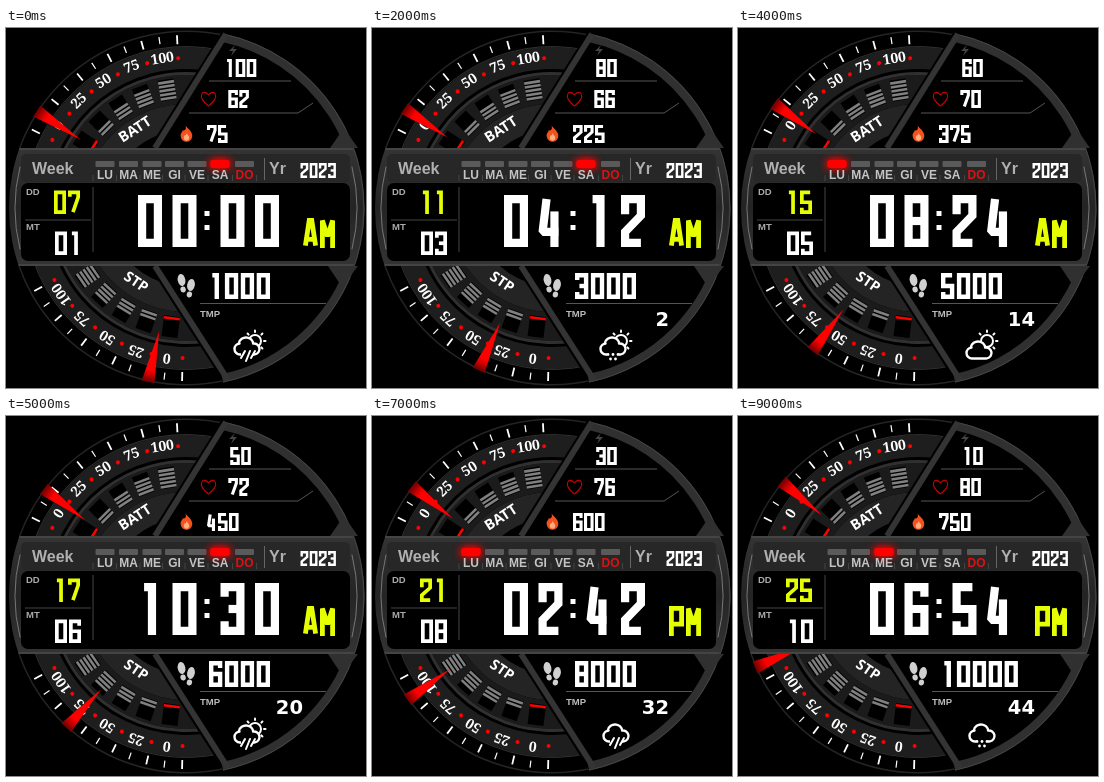
These frames come from a looping animation (360 by 360 pixels, 10 s). An HTML page with a canvas:

```html
<!DOCTYPE html>
<html lang="en">
<head>
<meta charset="utf-8">
<title>Watch face</title>
<style>
html, body { margin: 0; width: 100%; height: 100%; overflow: hidden; background: #000; }
canvas { display: block; }
</style>
</head>
<body>
<canvas id="face" width="360" height="360" role="img" aria-label="Watch face with date, time, battery, steps and weather"></canvas>
<script>
const ctx = document.getElementById('face').getContext('2d');
const C = 180, STEP_MS = 1000, STATES = 10;
const RAD = Math.PI / 180;
const SANS = '"Liberation Sans", Arial, sans-serif';
const RED = '#f00', YELLOW = '#e6ff00', WHITE = '#fff';
const DAYS = ['LU', 'MA', 'ME', 'GI', 'VE', 'SA', 'DO'];
const DAY_X = [99, 122.5, 146, 168.5, 191, 214, 238.5];
const WEATHER = ['sun rain', 'sun', 'sun snow', 'sun', 'sun', 'sun rain', 'sun snow', 'rain', '', 'snow'];

// Strokes on an 8 x 8 grid, each point written as "xy"
const GLYPHS = {
  0: '00 80 88 08 00 80',
  1: '10 50 58',
  2: '02 00 80 83 06 08 88',
  3: '01 00 80 88 08 07|24 84',
  4: '20 06 86|63 68',
  5: '80 00 04 84 88 08 07',
  6: '81 80 00 08 88 84 04',
  7: '01 00 80 82 38',
  8: '00 80 88 08 00 80|04 84',
  9: '84 04 00 80 88 08 07',
  A: '08 30 50 88|16 76',
  M: '08 00 45 80 88',
  P: '08 00 80 85 05'
};

function line(points, color, width = 1) {
  ctx.beginPath();
  points.forEach(([x, y]) => ctx.lineTo(x, y));
  ctx.strokeStyle = color;
  ctx.lineWidth = width;
  ctx.stroke();
}

function fillPoly(points, color) {
  ctx.beginPath();
  points.forEach(([x, y]) => ctx.lineTo(x, y));
  ctx.closePath();
  ctx.fillStyle = color;
  ctx.fill();
}

function disc(x, y, r, color) {
  ctx.beginPath();
  ctx.arc(x, y, r, 0, 2 * Math.PI);
  ctx.fillStyle = color;
  ctx.fill();
}

function box(x, y, w, h, r, color) {
  ctx.beginPath();
  ctx.roundRect(x, y, w, h, r);
  ctx.fillStyle = color;
  ctx.fill();
}

function label(str, x, y, font, color, align = 'left') {
  ctx.font = font;
  ctx.textAlign = align;
  ctx.fillStyle = color;
  ctx.fillText(str, x, y);
}

// Square condensed lettering: fixed pitch, size and stroke weight
function digits(str, x, y, [w, h, pitch, lw], color) {
  ctx.lineJoin = 'miter';
  ctx.miterLimit = 1.5;
  [...str].forEach((ch, i) => {
    GLYPHS[ch].split('|').forEach(stroke => {
      const pts = stroke.split(' ').map(p => [
        x + i * pitch + lw / 2 + p[0] / 8 * (w - lw),
        y + lw / 2 + p[1] / 8 * (h - lw)
      ]);
      // Square off straight ends so stems reach the full glyph box
      [pts, [...pts].reverse()].forEach(end => {
        const [a, b] = end.slice(-2);
        if (a[0] === b[0]) b[1] += lw / 2 * Math.sign(b[1] - a[1]);
      });
      line(pts, color, lw);
    });
  });
}

// Runs draw() with the origin on the dial centre and "up" pointing at the angle
function radial(deg, draw) {
  ctx.save();
  ctx.translate(C, C);
  ctx.rotate((deg + 90) * RAD);
  draw();
  ctx.restore();
}

function ring(r1, r2, from, to, color) {
  ctx.beginPath();
  ctx.arc(C, C, (r1 + r2) / 2, from * RAD, to * RAD);
  ctx.strokeStyle = color;
  ctx.lineWidth = r2 - r1;
  ctx.stroke();
}

function dial(start, name, nameDeg, flip, needleDeg, edge) {
  ctx.save();
  ctx.beginPath();
  edge.forEach(([x, y]) => ctx.lineTo(x, y));
  ctx.clip();
  const from = start - 26, to = start + 76;
  ring(78, 104, from, to, '#242424');
  ring(104, 133, from, to, '#1b1b1b');
  ring(133, 136, from, to, '#303030');
  ring(139, 161, from, to, '#1e1e1e');
  ring(161, 162, from, to, '#303030');
  ring(176, 177.5, from, to, '#242424');

  for (let i = 0; i < 11; i++) {
    radial(start - 6 + i * 6, () =>
      line([[0, i % 2 ? -166 : -164], [0, -173]], WHITE, i % 2 ? 1.2 : 1.8));
  }
  for (let i = 0; i < 6; i++) {
    radial(start - 6 + i * 12, () => disc(0, -150, 2, RED));
  }
  for (let i = 0; i < 5; i++) {
    radial(start + i * 12, () => {
      label(String(i * 25), 0, -147, 'bold 14px "Noto Serif", serif', WHITE, 'center');
      box(-8, -130, 16, 21, 0, '#000');
      for (let j = 0; j <= i; j++) {
        box(-8, -112.5 - j * 4, 16, 2.6, 0, i ? '#808080' : RED);
      }
    });
  }
  radial(nameDeg, () => {
    if (flip) ctx.rotate(Math.PI);
    label(name, 0, flip ? 94 : -89, '600 14.5px "Noto Sans", sans-serif', WHITE, 'center');
  });
  ctx.restore();
  radial(needleDeg, () => {
    const g = ctx.createLinearGradient(0, -179, 0, -166);
    g.addColorStop(0, '#600000');
    g.addColorStop(1, RED);
    fillPoly([[-6.5, -178], [6.5, -178], [0, -126]], g);
  });
}

function heart(x, y) {
  ctx.beginPath();
  ctx.moveTo(x, y + 7);
  ctx.bezierCurveTo(x - 13, y - 3, x - 5, y - 11, x, y - 4);
  ctx.bezierCurveTo(x + 5, y - 11, x + 13, y - 3, x, y + 7);
  ctx.strokeStyle = '#c80000';
  ctx.lineWidth = 1.1;
  ctx.stroke();
}

function flame(x, y, s, color) {
  ctx.beginPath();
  ctx.moveTo(x - s, y - 9 * s);
  ctx.bezierCurveTo(x + 2 * s, y - 5 * s, x + 7 * s, y - 2 * s, x + 6 * s, y + 3 * s);
  ctx.bezierCurveTo(x + 5 * s, y + 10 * s, x - 5 * s, y + 10 * s, x - 6 * s, y + 3 * s);
  ctx.bezierCurveTo(x - 7 * s, y - s, x - 4 * s, y - 2 * s, x - 4 * s, y - 4 * s);
  ctx.bezierCurveTo(x - s, y - 3 * s, x, y - 6 * s, x - s, y - 9 * s);
  ctx.fillStyle = color;
  ctx.fill();
}

function shoe(x, y, side) {
  const oval = (dx, dy, rx, ry) => {
    ctx.beginPath();
    ctx.ellipse(x + dx * side, y + dy, rx, ry, -0.2 * side, 0, 2 * Math.PI);
    ctx.fillStyle = '#d0d0d0';
    ctx.fill();
  };
  oval(0, -3, 3.8, 6);
  oval(1.6, 6.5, 2.7, 3);
}

function weather(kind) {
  const sun = kind.includes('sun'), x = sun ? 241 : 244;
  const y = sun ? (kind === 'sun' ? 322 : 318) : 317;
  ctx.save();
  ctx.lineCap = ctx.lineJoin = 'round';
  if (sun) {
    ctx.beginPath();
    ctx.arc(249, 313, 6, 0, 2 * Math.PI);
    ctx.strokeStyle = WHITE;
    ctx.lineWidth = 2;
    ctx.stroke();
    for (let a = -135; a <= 45; a += 45) {
      const c = Math.cos(a * RAD), s = Math.sin(a * RAD);
      line([[249 + 9 * c, 313 + 9 * s], [249 + 10.5 * c, 313 + 10.5 * s]], WHITE, 2);
    }
  }
  ctx.beginPath();
  ctx.arc(x - 7, y + 3, 5.5, 90 * RAD, 265 * RAD);
  ctx.arc(x - 1, y - 1, 7.5, 190 * RAD, 340 * RAD);
  ctx.arc(x + 7, y + 3, 5.5, 260 * RAD, 90 * RAD);
  ctx.closePath();
  ctx.fillStyle = '#000';
  ctx.fill();
  ctx.strokeStyle = WHITE;
  ctx.lineWidth = 2.4;
  ctx.stroke();
  if (kind.includes('rain')) {
    box(x - 6, y + 6, 12, 4, 0, '#000');
    for (let i = 0; i < 3; i++) {
      const px = x - 4 + i * 5, d = i === 1 ? 3 : 0;
      line([[px + 2, y + 5], [px - 2, y + 12 + d]], WHITE, 2);
    }
  }
  if (kind.includes('snow')) {
    box(x - 6, y + 6, 12, 4, 0, '#000');
    for (let i = 0; i < 5; i++) {
      disc(x - 5 + i * 2.5, y + (i % 2 ? 13 : 8.5), 1.4, WHITE);
    }
  }
  ctx.restore();
}

function sidePanels() {
  ring(170, 178.5, -78, 78, '#303030');
  ring(177.5, 178.5, -78, 78, '#454545');
  fillPoly([[324, 120], [338, 100], [352, 120]], '#303030');
  fillPoly([[322, 238], [336, 259], [352, 238]], '#303030');
  line([[220, 6], [149, 120]], '#343434', 6);
  line([[149, 238], [222, 352]], '#343434', 6);
  line([[203, 53], [285, 53]], '#555');
  line([[183, 85], [292, 85], [307, 75]], '#555');
  line([[194, 275.5], [320, 275.5]], '#555');

  fillPoly([[229, 17], [223, 23], [227, 23], [225, 28], [231, 21], [227, 21]], '#444');
  heart(202.5, 71);
  flame(180.5, 106, 0.95, '#f4511e');
  flame(180.5, 109, 0.45, '#ffb07a');
  shoe(175.5, 255, 1);
  shoe(185, 260, -1);
  label('TMP', 194, 289, `bold 9.5px ${SANS}`, '#bbb');
}

function band() {
  ctx.save();
  ctx.beginPath();
  ctx.arc(C, C, 177, 0, 2 * Math.PI);
  ctx.clip();
  const g = ctx.createLinearGradient(0, 120, 0, 238);
  g.addColorStop(0, '#343434');
  g.addColorStop(0.5, '#242424');
  g.addColorStop(1, '#343434');
  ctx.fillStyle = g;
  ctx.fillRect(0, 120, 360, 118);
  line([[0, 121], [360, 121]], '#444', 2);
  line([[0, 237], [360, 237]], '#444', 2);
  ctx.restore();
  ring(170.5, 171.5, 166, 194, '#777');
  ring(170.5, 171.5, -14, 14, '#777');
  box(15, 126, 329, 28, 5, '#272727');
  box(15, 155, 329, 78, 7, '#000');
  line([[87, 159], [87, 224]], '#444');
  line([[19, 192], [85, 192]], '#444');
  line([[258.5, 130], [258.5, 152]], '#666');

  label('Week', 26, 146, `bold 16px ${SANS}`, '#b0b0b0');
  label('Yr', 263, 146, `bold 16px ${SANS}`, '#b0b0b0');
  label('DD', 20, 167, `bold 9.5px ${SANS}`, '#aaa');
  label('MT', 20, 202, `bold 9.5px ${SANS}`, '#aaa');
  digits('2023', 294.5, 135, [7.8, 15, 9.2, 2.4], WHITE);
}

function weekdays(active) {
  DAYS.forEach((day, i) => {
    const x = DAY_X[i];
    ctx.save();
    if (i === active) {
      ctx.shadowColor = RED;
      ctx.shadowBlur = 9;
      box(x - 9.5, 132, 19, 8, 2, RED);
    }
    box(x - 9.5, 133, 19, 6, 1, i === active ? RED : '#5a5a5a');
    ctx.restore();
    line([[x - 12, 147], [x - 12, 153]], '#444');
    label(day, x, 151, `bold 12px ${SANS}`, i === 6 ? '#e01010' : '#c4c4c4', 'center');
  });
  line([[250.5, 147], [250.5, 153]], '#444');
}

const two = n => String(n).padStart(2, '0');

function draw(k) {
  ctx.fillStyle = '#000';
  ctx.fillRect(0, 0, 360, 360);

  dial(213, 'BATT', 237, false, 213 + Math.floor(0.8 * k + 0.1),
    [[0, 0], [218, 0], [143, 120], [0, 120]]);
  dial(97.3, 'STP', 124, true, 102.3 + 6 * k,
    [[0, 238], [143, 238], [221, 360], [0, 360]]);
  sidePanels();
  band();

  const day = 7 + 2 * k, month = 1 + k;
  const weekday = (new Date(2023, k, day).getDay() + 6) % 7;
  weekdays(weekday);
  const date = [12, 23.5, 14, 3.7];
  digits(two(day), 48, 162.5, date, YELLOW);
  digits(two(month), 49, 203.5, date, WHITE);

  const big = [24, 52, 34.5, 8.2];
  digits(two(2 * k % 12), 132, 167, big, WHITE);
  digits(two(6 * k), 214.5, 167, big, WHITE);
  box(198.5, 183, 5, 5, 0, WHITE);
  box(198.5, 197, 5, 5, 0, WHITE);
  digits(k < 6 ? 'AM' : 'PM', 297, 190, [15, 30, 17, 4.8], YELLOW);

  const small = [9.6, 18, 11, 3.1];
  const battery = String(100 - 10 * k);
  digits(battery, 234.5 - battery.length * 5.5 + 0.7, 31, small, WHITE);
  digits(String(62 + 2 * k), 222.3, 62, small, WHITE);
  digits(String(75 + 75 * k), 201, 97, small, WHITE);
  digits(String(1000 * (k + 1)), 203, 245, [13.3, 26, 15.9, 4.4], WHITE);

  const temp = 6 * k - 10;
  if (temp >= 0) label(String(temp), 297, 298, 'bold 19.5px "DejaVu Sans", sans-serif', WHITE, 'right');
  weather(WEATHER[k]);
}

function tick() {
  draw(Math.floor(performance.now() / STEP_MS) % STATES);
  requestAnimationFrame(tick);
}
tick();
</script>
</body>
</html>
```
